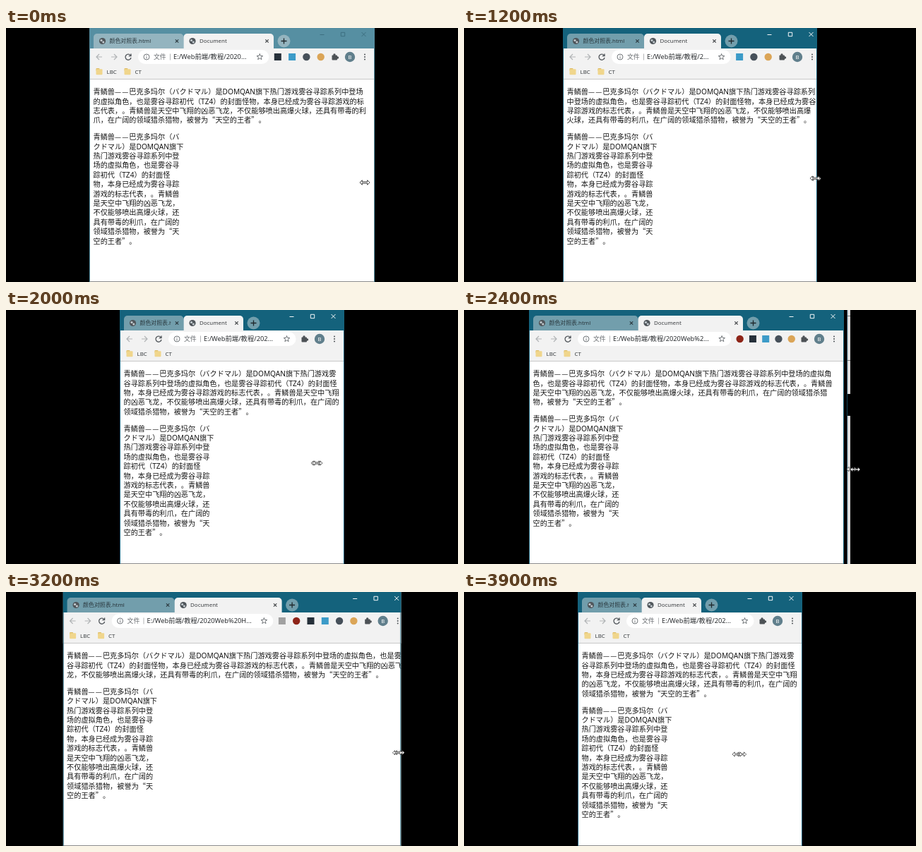
Recreate the animation shown at these times as an HTML page with a canvas. Size 640 px wide and 360 px high, loop 4000 ms.

```html
<!DOCTYPE html>
<html lang="zh-CN">
<head>
<meta charset="utf-8">
<title>Window resize</title>
<style>
html, body { margin: 0; width: 100%; height: 100%; overflow: hidden; background: #000; }
canvas { display: block; width: 640px; height: 360px; }
</style>
</head>
<body>
<canvas id="stage" width="640" height="360"></canvas>
<script>
const ctx = document.getElementById('stage').getContext('2d');
const LOOP = 4000, STEP = 100, PRESS = 900;
const LATIN = '"Noto Sans", "Noto Sans CJK SC", sans-serif';
const HAN = '"Noto Sans CJK SC", "Noto Sans", sans-serif';
const BODY = 10.17, LINE = 13.42, COLUMN = 128.5;
const COPY = '青鳞兽——巴克多玛尔（バクドマル）是DOMQAN旗下热门游戏雾谷寻踪系列中登场的虚拟角色，' +
  '也是雾谷寻踪初代（TZ4）的封面怪物，本身已经成为雾谷寻踪游戏的标志代表，。' +
  '青鳞兽是天空中飞翔的凶恶飞龙，不仅能够喷出高爆火球，还具有带毒的利爪，' +
  '在广阔的领域猎杀猎物，被誉为“天空的王者”。';
const URL_TEXT = 'E:/Web前端/教程/2020Web%20HTML%20CSS/01-05.html';
const URL_SIZE = 9.3, LABEL = 7.9;
const EXTENSIONS = ['#dba557', '#46505a', '#3c9bc8', '#26303a', '#8e2418', '#a0a0a0'];

// [time, value...]
const HALF = [[0, 202], [900, 202], [1200, 180], [1500, 159], [2100, 159], [2200, 178], [2400, 228],
  [2600, 263], [2800, 282], [2900, 282], [3000, 271], [3500, 192], [3600, 162], [3700, 159]];
// How far the page layout trails behind the window edge.
const LAG = [[0, 0], [900, 0], [1200, 7], [1400, 7], [1500, 0], [2100, 0], [2200, -8], [2400, -10],
  [2700, -2], [2800, 0], [2900, 0], [3000, 8], [3500, 11.2], [3600, 8], [3700, 0]];
const POINTER = [[0, 508, 219], [600, 519, 219], [900, 521, 217], [1200, 497, 213], [1800, 425, 216],
  [1900, 430, 217], [2000, 441, 217], [2400, 554, 226], [2800, 603, 226], [3000, 586, 227],
  [3500, 507, 229], [3700, 450, 230], [3900, 387, 230]];

function at(keys, t, k = 1) {
  const i = keys.findIndex(key => key[0] > t);
  if (i < 0) return keys[keys.length - 1][k];
  if (i === 0) return keys[0][k];
  const a = keys[i - 1], b = keys[i];
  return a[k] + (b[k] - a[k]) * (t - a[0]) / (b[0] - a[0]);
}

const layoutWidth = t => 2 * at(HALF, t) + at(LAG, t);
const fitting = w => Math.max(0, Math.min(6, Math.floor((w - 303.5) / 20.3)));

function extensionCount(t) {
  const recent = [0, 50, 100, 150].map(d => fitting(layoutWidth(Math.max(0, t - d))));
  return Math.min(recent[0], recent.reduce((a, b) => a + b) / 4);
}

function measure(s, size) {
  ctx.font = `100px ${LATIN}`;
  return ctx.measureText(s).width * size / 100;
}

function text(s, x, y, size, color, align = 'left', family = LATIN) {
  ctx.font = `${size}px ${family}`;
  ctx.fillStyle = color;
  ctx.textAlign = align;
  ctx.fillText(s, x, y);
}

function rect(x, y, w, h, color) {
  ctx.fillStyle = color;
  ctx.fillRect(x, y, w, h);
}

function round(x, y, w, h, r, color) {
  ctx.beginPath();
  ctx.roundRect(x, y, w, h, r);
  ctx.fillStyle = color;
  ctx.fill();
}

function disc(x, y, r, color) {
  ctx.beginPath();
  ctx.arc(x, y, r, 0, 7);
  ctx.fillStyle = color;
  ctx.fill();
}

function stroke(path, x, y, color, width = 1) {
  ctx.save();
  ctx.translate(x, y);
  ctx.strokeStyle = color;
  ctx.lineWidth = width;
  ctx.stroke(new Path2D(path));
  ctx.restore();
}

// Every Han glyph and full-width mark fills one em; Latin words keep their own width.
const isWord = s => /^\w/.test(s);
const RUNS = /\w+|./gu;
const runWidth = run => isWord(run) ? measure(run, BODY) : BODY;
const PARTS = COPY.match(/[（“]*(?:\w+|—+|.)[，。）”]*/gu).map(part => {
  const runs = part.match(RUNS);
  return { runs, width: runs.reduce((sum, run) => sum + runWidth(run), 0) };
});

function paragraph(x, y, limit) {
  let used = 0;
  for (const { runs, width } of PARTS) {
    if (used && used + width > limit) {
      used = 0;
      y += LINE;
    }
    for (const run of runs) {
      text(run, x + used, y, BODY, '#161616', 'left', isWord(run) ? LATIN : HAN);
      used += runWidth(run);
    }
  }
  return y + LINE;
}

function ellipsize(s, limit, size) {
  if (measure(s, size) <= limit) return s;
  while (s && measure(s + '...', size) > limit) s = s.slice(0, -1);
  return s + '...';
}

function globe(x, y) {
  disc(x, y, 4.6, '#50565b');
  disc(x - 1.5, y - 1, 1.6, '#c3cbd0');
  disc(x + 1.3, y + 1.4, 1.5, '#c3cbd0');
}

function tab(x, w, title, fill, ink) {
  round(x, 8, w, 22, [5, 5, 0, 0], fill);
  globe(x + 12.5, 18.5);
  ctx.save();
  ctx.beginPath();
  ctx.rect(x, 8, w - 18, 22);
  ctx.clip();
  text(title, x + 22.5, 21.4, LABEL, ink);
  ctx.restore();
  stroke('M-2.2 -2.2L2.2 2.2M2.2 -2.2L-2.2 2.2', x + w - 9.5, 18.5, ink, 1.1);
}

function titleBar(left, width, active) {
  const right = left + width, tabW = Math.min(152, (width - 149) / 2);
  const idle = active ? '#729eac' : '#94b4bf';
  rect(left, 0, width, 29, active ? '#14627c' : '#568fa2');
  tab(left + 6, tabW, '颜色对照表.html', idle, '#29363c');
  tab(left + 6 + tabW, tabW, 'Document', '#f2f2f2', '#3a3d40');
  const plus = left + 20.5 + 2 * tabW;
  disc(plus, 18.5, 9, idle);
  stroke('M-4 0H4M0 -4V4', plus, 18.5, '#20282c', 1.3);
  const ink = active ? '#f4f8f9' : '#3d6f80';
  stroke('M-3 0H3', right - 74.5, 9.5, ink);
  stroke('M-2.7 -2.7H2.7V2.7H-2.7Z', right - 45, 9, ink);
  stroke('M-3 -3L3 3M3 -3L-3 3', right - 15.5, 9, ink);
}

function folder(x, label) {
  round(x - 4.5, 57, 5, 4, 1, '#dfbd68');
  round(x - 4.5, 58.3, 9, 8, 1, '#f0d68c');
  text(label, x + 10.5, 64.8, LABEL, '#3c4043');
}

function star(x, y) {
  ctx.beginPath();
  for (let i = 0; i < 10; i++) {
    const r = i % 2 ? 1.9 : 4.5, a = i * Math.PI / 5;
    ctx.lineTo(x + r * Math.sin(a), y - r * Math.cos(a));
  }
  ctx.closePath();
  ctx.strokeStyle = '#62676b';
  ctx.lineWidth = 0.9;
  ctx.stroke();
}

function toolbar(left, width, t) {
  const right = left + width, y = 41, n = extensionCount(t);
  const starX = right - 81.5 - 20.3 * n;
  rect(left, 29, width, 43, '#f2f2f2');
  rect(left, 72, width, 1, '#c9c9c9');
  stroke('M4 0H-4M0 -4L-4 0L0 4', left + 14, y, '#b1b4b6', 1.2);
  stroke('M-4 0H4M0 -4L4 0L0 4', left + 35, y, '#b1b4b6', 1.2);
  stroke('M3.2 -2.3A4 4 0 1 0 4 1M4 -4.5V-1.3H.8', left + 55, y, '#50555a', 1.3);

  round(left + 69, 31, starX + 13 - left - 69, 20, 10, '#fff');
  stroke('M4 0A4 4 0 1 1 -4 0A4 4 0 1 1 4 0M0 -2.3V-1.2M0 -.3V2.4', left + 81, y, '#62676b', 0.9);
  text('文件', left + 91, 44.4, 8.9, '#686c70');
  rect(left + 114, 36.5, 0.8, 9, '#a0a3a6');
  const urlX = left + 119;
  text(ellipsize(URL_TEXT, starX - 17 - urlX, URL_SIZE), urlX, 44.4, URL_SIZE, '#292c2f');
  star(starX, y);

  const count = Math.ceil(n), gap = count ? 20.3 * n / count : 0;
  for (let i = count; i >= 1; i--) {
    const x = right - 56 - gap * i, color = EXTENSIONS[i - 1];
    if (i < 3 || i === 5) disc(x, y, 5.2, color);
    else rect(x - 5, y - 5, 10, 10, color);
  }
  round(right - 60.5, y - 2.5, 7.5, 7, 1, '#4d5256');
  disc(right - 57, y - 3, 1.7, '#4d5256');
  disc(right - 52.5, y + 1, 1.7, '#4d5256');
  disc(right - 35, y, 7.2, '#607f8c');
  text('B', right - 35, y + 2.8, 7.7, '#fff', 'center');
  for (const dy of [-3.4, 0, 3.4]) disc(right - 14, y + dy, 1, '#4d5256');
  folder(left + 14, 'LBC');
  folder(left + 54, 'CT');
}

function pointer(t) {
  const shape = new Path2D('M-7 0L-3.8 -3.2V-.9H3.8V-3.2L7 0L3.8 3.2V.9H-3.8V3.2Z');
  for (const back of [18, 0]) {
    const s = Math.max(0, t - back);
    ctx.save();
    ctx.translate(at(POINTER, s), at(POINTER, s, 2));
    ctx.fillStyle = '#fff';
    ctx.strokeStyle = '#222';
    ctx.lineWidth = 0.7;
    ctx.fill(shape);
    ctx.stroke(shape);
    ctx.restore();
  }
}

function draw(t) {
  const half = at(HALF, t), lag = at(LAG, t), width = layoutWidth(t);
  const left = 320 - half, right = 320 + half, active = t >= PRESS;
  const shown = Math.min(2 * half, width);
  rect(0, 0, 640, 360, '#000');
  if (lag <= -6) {
    rect(right - 6, 0, 1, 360, '#14455a');
    rect(right - 5, 0, 4, 360, '#dedede');
    rect(right - 5, 119, 4, 31, '#000');
    rect(right - 5, 8, 4, 1, '#777');
    rect(right - 5, 71, 4, 1, '#777');
  }
  ctx.save();
  ctx.beginPath();
  ctx.rect(left, 0, shown, 360);
  ctx.clip();
  rect(left, 0, width, 360, '#fff');
  titleBar(left, width, active);
  toolbar(left, width, t);
  const x = left + 5.5;
  const end = paragraph(x, 94.2, width - 12.3);
  paragraph(x, end + 10.2, COLUMN);
  rect(left, 359, width, 1, '#8b8b8b');
  const border = active ? '#14627c' : '#568fa2';
  rect(left, 0, 1, 360, border);
  rect(left + shown - 1, 0, 1, 360, border);
  ctx.restore();
  pointer(t);
}

function frame() {
  draw(Math.floor(performance.now() % LOOP / STEP) * STEP);
  requestAnimationFrame(frame);
}
frame();
</script>
</body>
</html>
```
